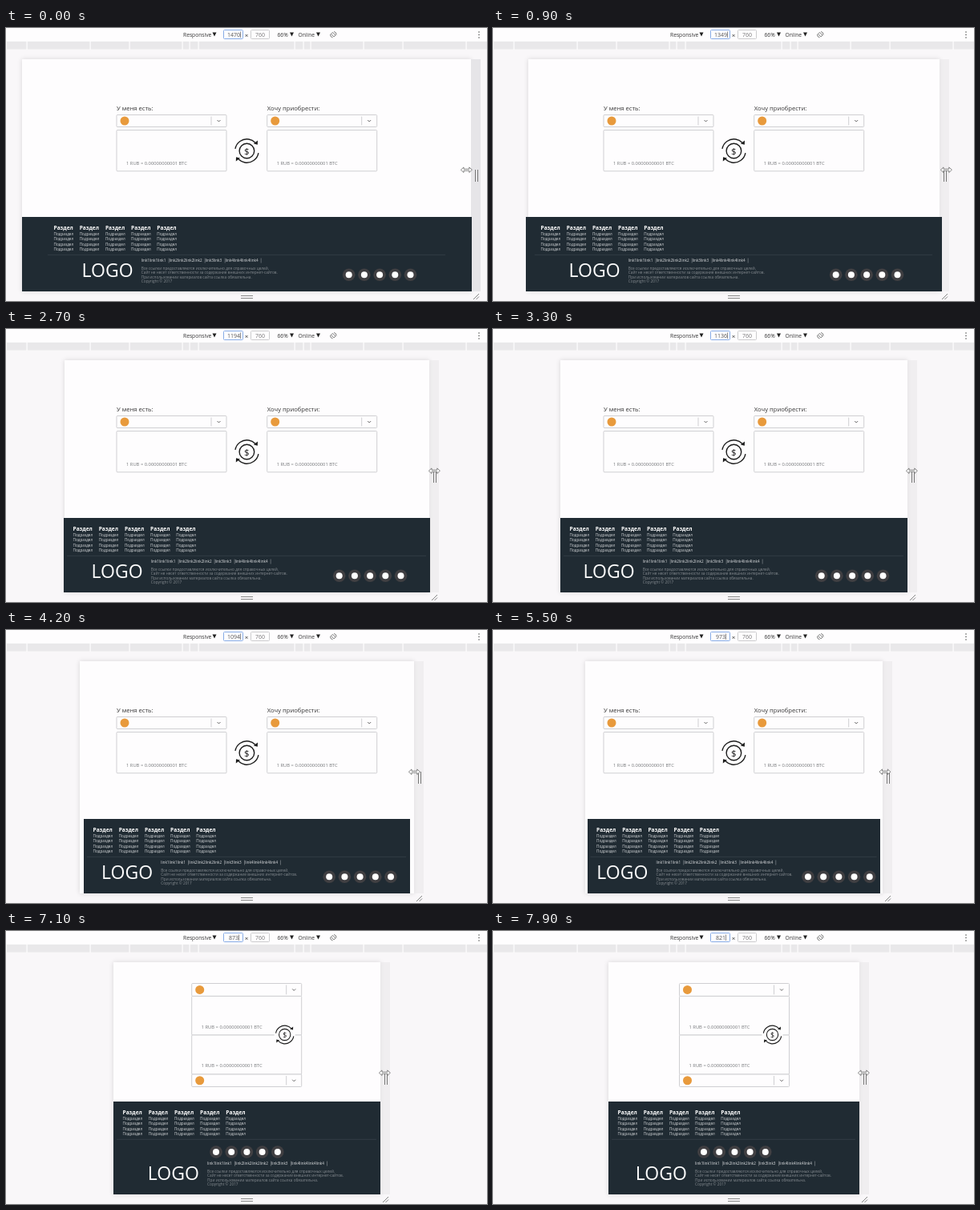
These frames come from a looping animation (600 px wide and 341 px high, 8000 ms). An HTML page with a canvas:

```html
<!DOCTYPE html>
<html lang="ru">
<head>
<meta charset="utf-8">
<title>Responsive page</title>
<style>
  html, body { margin: 0; width: 100%; height: 100%; overflow: hidden; background: #f9f7f9; }
  canvas { display: block; width: 600px; height: 341px; }
</style>
</head>
<body>
<canvas id="stage"></canvas>
<script>
const canvas = document.getElementById('stage');
const ctx = canvas.getContext('2d');
const dpr = window.devicePixelRatio || 1;
canvas.width = 600 * dpr;
canvas.height = 341 * dpr;
ctx.scale(dpr, dpr);

const LOOP = 8000, STEP = 100;
const PAPER = '#fefdfe', DARK = '#202b33', LINE = '#cfcfd2', INK = '#333';

// [time, value] pairs: viewport width in CSS pixels, and left edge of the footer
const viewport = [[0, 1470], [900, 1349], [1800, 1281], [2000, 1258], [2700, 1194], [3300, 1136],
  [3600, 1136], [4200, 1094], [4500, 1040], [5400, 975], [5500, 973], [6300, 919], [7100, 873],
  [7200, 873], [7900, 821]];
const footerLeft = [[0, 20], [900, 41], [1800, 60], [2000, 64], [2700, 72], [3300, 84], [3600, 84],
  [4200, 97], [4500, 104], [5400, 114], [5500, 117.5], [6300, 127], [7100, 134], [7200, 134.5], [7900, 144]];

function at(keys, t) {
  const i = keys.findIndex(k => k[0] >= t);
  if (i < 0) return keys[keys.length - 1][1];
  if (i === 0) return keys[0][1];
  const [t0, a] = keys[i - 1], [t1, b] = keys[i];
  return a + (b - a) * (t - t0) / (t1 - t0);
}

function rect(x, y, w, h, color) {
  ctx.fillStyle = color;
  ctx.fillRect(x, y, w, h);
}

function box(x, y, w, h, color = LINE, r = 1) {
  ctx.beginPath();
  ctx.roundRect(x, y, w, h, r);
  ctx.fillStyle = PAPER;
  ctx.fill();
  ctx.strokeStyle = color;
  ctx.lineWidth = 1;
  ctx.stroke();
}

function line(points, color, width = 1) {
  ctx.beginPath();
  points.forEach(([x, y]) => ctx.lineTo(x, y));
  ctx.strokeStyle = color;
  ctx.lineWidth = width;
  ctx.stroke();
}

function shape(points, color) {
  ctx.beginPath();
  points.forEach(([x, y]) => ctx.lineTo(x, y));
  ctx.closePath();
  ctx.fillStyle = color;
  ctx.fill();
}

function disc(x, y, r, color) {
  ctx.beginPath();
  ctx.arc(x, y, r, 0, 7);
  ctx.fillStyle = color;
  ctx.fill();
}

function text(s, x, y, size, color, align = 'left', weight = 400) {
  ctx.font = `${weight} ${size}px "Open Sans", "Noto Sans", sans-serif`;
  ctx.textAlign = align;
  ctx.fillStyle = color;
  ctx.fillText(s, x, y);
}

function toolbar(width) {
  rect(0, 0, 600, 16, PAPER);
  text('Responsive', 221, 10.8, 6.7, INK);
  text('66%', 338.5, 10.8, 6.7, INK);
  text('Online', 364.5, 10.8, 6.7, INK);
  for (const x of [257.5, 354, 387]) shape([[x, 5.5], [x + 5, 5.5], [x + 2.5, 10.5]], '#222');

  box(271.5, 2.5, 24, 11, '#86abe6');
  box(305.5, 2.5, 23, 11, '#cbcbcd');
  text(width, 284, 10.9, 7, '#555', 'center');
  rect(284 + ctx.measureText(width).width / 2 + 0.2, 4.5, 0.6, 7.5, '#444');
  text('760', 317, 10.9, 7, '#777', 'center');
  text('×', 300, 11.5, 8, INK, 'center');

  ctx.save();
  ctx.translate(408.3, 8.2);
  ctx.rotate(-Math.PI / 4);
  ctx.strokeStyle = '#666';
  ctx.lineWidth = 0.8;
  ctx.strokeRect(-1.4, -2.5, 2.8, 5);
  for (const a of [0, Math.PI]) {
    ctx.beginPath();
    ctx.arc(0, 0, 3.8, a - 0.6, a + 0.9);
    ctx.stroke();
  }
  ctx.restore();
  for (const y of [5, 8.5, 12]) disc(590, y, 0.8, '#555');

  rect(0, 16, 600, 11, '#fafafa');
  rect(1, 17, 599, 9.5, '#e9e8ea');
  for (const x of [26, 105, 154, 220, 229, 240]) {
    rect(x - 0.5, 16, 1.2, 11, PAPER);
    rect(599.5 - x, 16, 1.2, 11, PAPER);
  }
}

function selectBox(x, y, h) {
  box(x, y, 137, h);
  disc(x + 10, y + h / 2, 5.5, '#e89a3c');
  line([[x + 118, y + 2], [x + 118, y + h - 2]], LINE);
  const cx = x + 127.5, cy = y + h / 2;
  line([[cx - 2, cy - 1], [cx, cy + 1], [cx + 2, cy - 1]], '#444', 0.8);
}

function amountBox(x, y, h) {
  box(x, y, 137, h);
  text('1 RUB = 0.00000000001 BTC', x + 12, y + (h > 50 ? 43 : 40.3), 5.8, '#747679');
}

function exchangeIcon(x, y, scale) {
  ctx.save();
  ctx.translate(x, y);
  ctx.scale(scale, scale);
  ctx.strokeStyle = '#1c1c1c';
  ctx.lineWidth = 1.4;
  ctx.beginPath();
  ctx.arc(0, 0, 9.3, 0, 7);
  ctx.stroke();
  text('$', 0, 4.2, 11.5, '#1c1c1c', 'center');
  for (let i = 0; i < 2; i++) {
    ctx.beginPath();
    ctx.arc(0, 0, 14.7, -2.97, -0.78);
    ctx.stroke();
    shape([[13.6, -13], [13.4, -7.8], [8.4, -9]], '#1c1c1c');
    ctx.rotate(Math.PI);
  }
  ctx.restore();
}

function wideForm() {
  ['У меня есть:', 'Хочу приобрести:'].forEach((label, i) => {
    const x = 138 + i * 187.7;
    text(label, x, 103, 7.6, '#333');
    selectBox(x, 108.5, 15);
    amountBox(x, 127.5, 51.3);
  });
  exchangeIcon(300.4, 153.5, 1);
}

function narrowForm(x) {
  amountBox(x, 81.3, 48.7);
  amountBox(x, 130, 49);
  selectBox(x, 65.5, 15.8);
  selectBox(x, 179, 15.5);
  rect(x + 103, 116, 26, 27, PAPER);
  exchangeIcon(x + 116, 129.5, 0.77);
}

function footer(left, narrow, shift) {
  const top = narrow ? 213 : 236, dy = narrow ? -23 : 0;
  const inner = Math.max(left, 48);
  const edge = Math.round(left);
  rect(edge, top, 601 - 2 * edge, 329 - top, DARK);

  for (let i = 0; i < 5; i++) {
    const x = inner + 11.5 + i * 32.2;
    text('Раздел', x, 251.5 + dy, 6.6, '#fff', 'left', 700);
    for (let j = 0; j < 4; j++) text('Подраздел', x, 258.8 + dy + j * 6.35, 4.7, '#d4d7d9');
  }
  line([[inner + 4, 283.3 + dy], [596 - inner, 283.3 + dy]], '#364149', 0.8);

  const logo = narrow ? 176.8 + shift : inner / 2 + 70.5;
  text('LOGO', logo, 311, 23, '#fff', 'left', 500);

  const x = logo + 74.3;
  const links = [[0, 'link1', 3], [35, 'link2', 4], [80, 'link3', 2], [105, 'link4', 4]];
  links.forEach(([dx, word, n], i) => {
    text(word.repeat(n), x + dx, 292, 4.6, '#e2e4e6');
    rect(x + [34, 79, 104, 149][i], 287.5, 0.6, 6, '#8b9297');
  });
  ['Все ссылки предоставляются исключительно для справочных целей.',
   'Сайт не несет ответственности за содержание внешних интернет-сайтов.',
   'При использовании материалов сайта ссылка обязательна.',
   'Copyright © 2017'].forEach((s, i) => text(s, x, 302.2 + i * 5.25, 4.74, '#868c91'));

  for (let i = 0; i < 5; i++) {
    const cx = (narrow ? 262 + shift : 451.7 - inner / 2) + i * 19.2;
    const cy = narrow ? 276 : 308.3;
    disc(cx, cy, 7.8, '#403f42');
    disc(cx, cy, 4, '#fff');
  }
}

function handles(right, cursor) {
  for (const x of [right + 5, right + 8]) rect(x, 177, 1, 15, '#777');
  for (const y of [334, 337]) rect(293, y, 15, 1, '#888');
  line([[right + 3, 339], [right + 10, 332]], '#777', 0.9);
  line([[right + 6.5, 339], [right + 10, 335.5]], '#777', 0.9);

  const y = 177.2;
  const arrow = [[-7, 0], [-3.4, -3.3], [-3.4, -1], [3.4, -1], [3.4, -3.3], [7, 0],
    [3.4, 3.3], [3.4, 1], [-3.4, 1], [-3.4, 3.3]].map(p => [cursor + p[0], y + p[1]]);
  shape(arrow, '#fff');
  line([...arrow, arrow[0]], '#666', 0.8);
}

function draw(t) {
  const width = Math.round(at(viewport, t));
  const half = width * 280 / 1470;
  const left = Math.ceil(300 - half), right = Math.ceil(300 + half);
  const foot = at(footerLeft, t);
  const narrow = (300 - foot) * 1470 / 280 < 900;
  const shift = Math.max(0, (foot - 134) / 10);

  rect(0, 0, 600, 341, '#f9f7f9');
  toolbar(String(width));

  ctx.save();
  ctx.shadowColor = 'rgba(0,0,0,.14)';
  ctx.shadowBlur = 6 * dpr;
  rect(left, 39, right - left, 290, PAPER);
  ctx.restore();
  rect(right, 39, 12, 290, t ? 'rgba(235,233,236,.6)' : '#e6e5e8');

  if (narrow) narrowForm(231.7 + shift * 0.8);
  else wideForm();
  footer(foot, narrow, shift);
  handles(right, 606.4 - foot - 12 * Math.max(0, 1 - t / 900));
}

function tick(now) {
  draw(Math.floor(now % LOOP / STEP) * STEP);
  requestAnimationFrame(tick);
}
draw(0);
requestAnimationFrame(tick);
</script>
</body>
</html>
```
